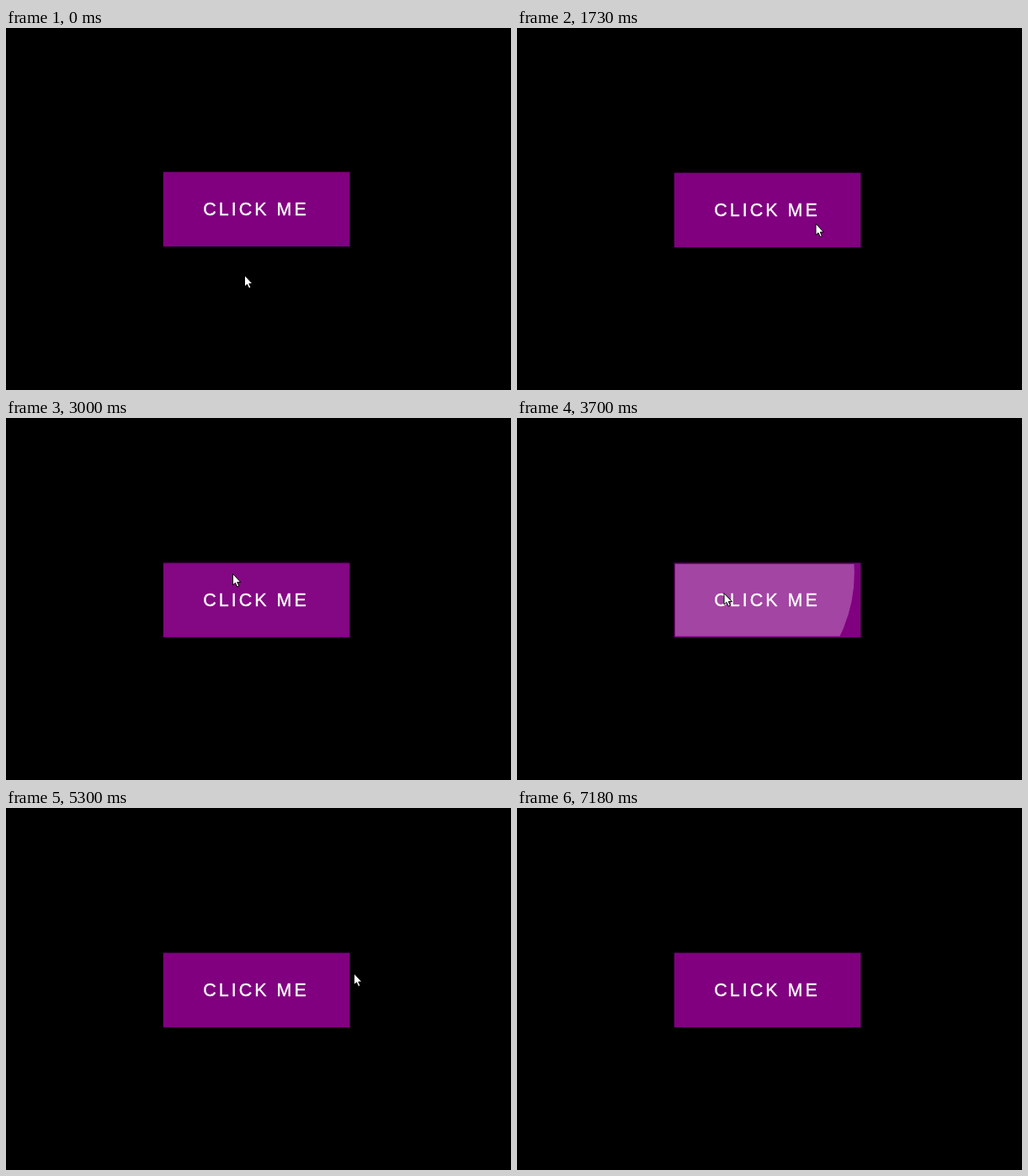
Animation of 600x431 px, one loop 7.21 s. Source, as an HTML page:

```html
<!DOCTYPE html>
<html lang="en">
<head>
<meta charset="utf-8">
<title>Button ripple</title>
<style>
  html, body { margin: 0; width: 100%; height: 100%; overflow: hidden; background: #000; }
  svg { display: block; width: 100%; height: 100%; }
  text {
    font: 21.5px "Liberation Sans", Arial, sans-serif; letter-spacing: 3px;
    fill: #fff; stroke: #fff; stroke-width: 0.35;
  }
</style>
</head>
<body>
<svg viewBox="0 0 600 431">
  <defs>
    <clipPath id="inside"><rect x="188" y="174" width="219.5" height="85.7"/></clipPath>
  </defs>
  <g id="button">
    <rect x="186.8" y="172.4" width="221.6" height="88.8" fill="#800080"/>
    <text x="234.3" y="223.6">CLICK ME</text>
  </g>
  <g clip-path="url(#inside)"><circle id="ripple" fill="#fff"/></g>
  <path id="cursor" d="M0 0V13.5L3 10.8L5.2 15.6L7.4 14.6L5.3 10H9.4Z" fill="#fff" stroke="#000"/>
</svg>
<script>
const LOOP = 7210;
const RIPPLE_TIME = 500;
const RIPPLE_RADIUS = 231;
const HOLD = 160; // the cursor rests this long before and after each stop

const stops = [
  { time: 0, x: 283.5, y: 294.5 },
  { time: 1030, x: 235.5, y: 232, click: true },
  { time: 1760, x: 355, y: 233, click: true },
  { time: 2570, x: 383, y: 187, click: true },
  { time: 3430, x: 232, y: 185, click: true },
  { time: 4314, x: 271.5, y: 251.5, click: true },
  { time: 5300, x: 413.5, y: 197 },
  { time: 6110, x: 350, y: 205, click: true },
  { time: 6680, x: 395, y: 116 }
];
const clicks = stops.filter(stop => stop.click);
const exit = stops[stops.length - 1];

const [button, ripple, cursor] = ["button", "ripple", "cursor"].map(id => document.getElementById(id));
const clamp = u => Math.min(1, Math.max(0, u));

function cursorAt(t) {
  const next = Math.max(1, stops.findIndex(stop => stop.time > t));
  const from = stops[next - 1], to = stops[next];
  const u = clamp((t - from.time - HOLD) / (to.time - from.time - 2 * HOLD));
  const k = u * (2 - u);
  return { x: from.x + (to.x - from.x) * k, y: from.y + (to.y - from.y) * k };
}

// cubic-bezier(0, 0, .58, 1), solved for its parameter by bisection
function easeOut(x) {
  let low = 0, high = 1;
  for (let i = 0; i < 24; i++) {
    const s = (low + high) / 2;
    if (1.74 * (1 - s) * s * s + s ** 3 < x) low = s;
    else high = s;
  }
  return low * low * (3 - 2 * low);
}

function draw(t) {
  button.setAttribute("transform", `translate(0 ${t < clicks[0].time ? -1 : 0})`);

  const click = clicks.findLast(({ time }) => time <= t) ?? clicks[0];
  const k = easeOut(clamp((t - click.time) / RIPPLE_TIME));
  ripple.setAttribute("cx", click.x + 0.5);
  ripple.setAttribute("cy", click.y + 0.5);
  ripple.setAttribute("r", RIPPLE_RADIUS * k);
  ripple.setAttribute("opacity", 1 - k);

  const visible = t < exit.time;
  cursor.setAttribute("visibility", visible ? "visible" : "hidden");
  if (visible) {
    const { x, y } = cursorAt(t);
    cursor.setAttribute("transform", `translate(${x} ${y})`);
  }
}

const begin = performance.now();
function tick() {
  draw((performance.now() - begin) % LOOP);
  requestAnimationFrame(tick);
}
tick();
</script>
</body>
</html>
```
